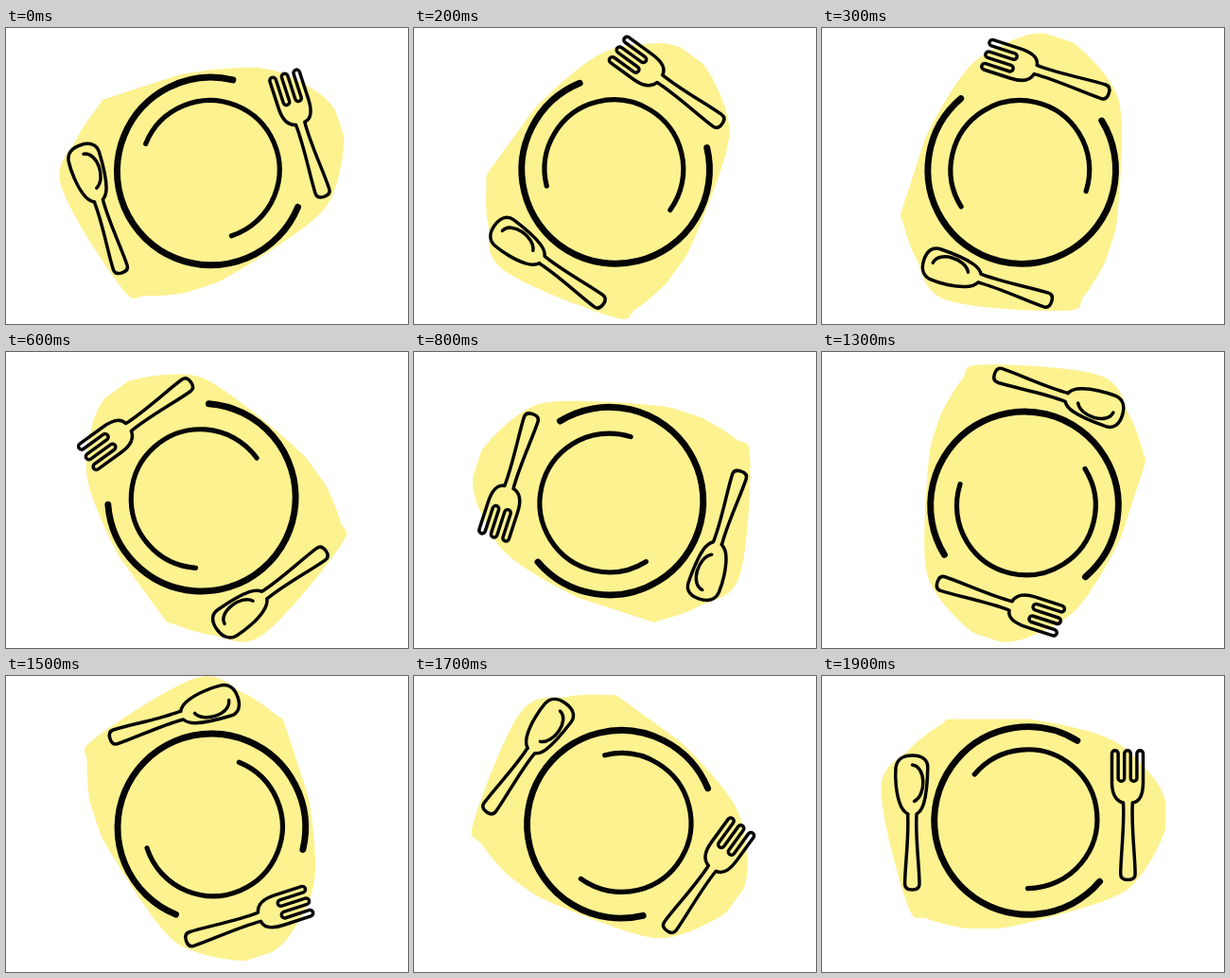
An HTML page with a canvas that plays this animation: 425 px wide and 313 px high, repeating every 2 s.

```html
<!DOCTYPE html>
<html lang="en">
<head>
<meta charset="utf-8">
<title>Turning plate</title>
<style>
  html, body { margin: 0; width: 100%; height: 100%; overflow: hidden; background: #fff; }
  canvas { display: block; }
</style>
</head>
<body>
<canvas id="stage" width="425" height="313"></canvas>
<script>
const ctx = document.getElementById('stage').getContext('2d');
const W = 425, H = 313;
const STEPS = 20, STEP_MS = 100;
const CENTER = { x: 212.6, y: 156.2 };
const YELLOW = '#fdf290', INK = '#050505';

// Key points of the mat, clockwise from the left corner
const mat = smoothLoop([
  [62.5, 120], [93, 77], [126, 51], [142, 45], [214, 45], [301, 65],
  [344, 100], [363, 132], [362, 165], [336, 212], [303, 236],
  [217, 261], [165, 268], [112, 257], [90, 241]
]);
const rim = arc(218, 153, 99.3, 40.4, 301.5);
const well = arc(217.5, 151.2, 73.4, 220, 450);
const spoon = spoonPath();
const shine = new Path2D('M95.5 94 C110 96 110.5 126 97.5 132.5');
const fork = forkPath();

// Closed curve through all points
function smoothLoop(pts) {
  const path = new Path2D();
  const n = pts.length;
  const at = i => pts[(i + n) % n];
  path.moveTo(...pts[0]);
  for (let i = 0; i < n; i++) {
    const [a, b, c, d] = [at(i - 1), at(i), at(i + 1), at(i + 2)];
    path.bezierCurveTo(
      b[0] + (c[0] - a[0]) / 6, b[1] + (c[1] - a[1]) / 6,
      c[0] - (d[0] - b[0]) / 6, c[1] - (d[1] - b[1]) / 6,
      c[0], c[1]);
  }
  path.closePath();
  return path;
}

function arc(x, y, radius, from, to) {
  const path = new Path2D();
  path.arc(x, y, radius, from * Math.PI / 180, to * Math.PI / 180);
  return path;
}

// Handle widening from the right side of the neck round to the left side
function addHandle(path, mid, neckY, neckHalf, endY) {
  const half = 7.7;
  path.bezierCurveTo(mid + neckHalf - 1.5, neckY + 24, mid + half, endY - 24, mid + half, endY - 6);
  path.quadraticCurveTo(mid + half, endY, mid, endY);
  path.quadraticCurveTo(mid - half, endY, mid - half, endY - 6);
  path.bezierCurveTo(mid - half, endY - 24, mid - neckHalf + 1.5, neckY + 24, mid - neckHalf, neckY);
}

function spoonPath() {
  const path = new Path2D(
    'M91 146 Q85 143 82 134 C78.5 124 77 108 78 97 C79 88 86 84 95.5 84 ' +
    'C105 84 112 88 111.8 97 C111.5 112 110.5 125 107.5 135 Q105 143 100 146');
  addHandle(path, 95.3, 146, 4.7, 226);
  path.closePath();
  return path;
}

function forkPath() {
  const path = new Path2D();
  const left = 306.5, gap = 6.6, r = gap / 2;
  const tipY = 82, slotY = 108, bodyY = 112;
  path.moveTo(left, bodyY);
  for (let i = 0; i < 5; i++) {
    const isSlot = i % 2 === 1;
    path.arc(left + gap * i + r, isSlot ? slotY : tipY, r, Math.PI, 0, isSlot);
  }
  path.lineTo(left + gap * 5, bodyY);
  path.bezierCurveTo(339.5, 124, 336, 133, 328.3, 134);
  addHandle(path, 323.4, 134, 4.9, 215.5);
  path.bezierCurveTo(310, 132, left, 124, left, bodyY);
  path.closePath();
  return path;
}

function stroke(path, width) {
  ctx.lineWidth = width;
  ctx.stroke(path);
}

function draw(time) {
  const step = Math.floor(time / STEP_MS) % STEPS;
  ctx.fillStyle = '#fff';
  ctx.fillRect(0, 0, W, H);

  ctx.save();
  ctx.translate(CENTER.x, CENTER.y);
  ctx.rotate(-(step + 1) / STEPS * 2 * Math.PI);
  ctx.translate(-CENTER.x, -CENTER.y);

  // The mat is cut off flat at its bounding box
  ctx.beginPath();
  ctx.rect(62, 45.5, 301, 221.5);
  ctx.clip();

  ctx.fillStyle = YELLOW;
  ctx.fill(mat);
  ctx.strokeStyle = INK;
  ctx.lineCap = ctx.lineJoin = 'round';
  stroke(rim, 6.9);
  stroke(well, 5.2);
  for (const part of [spoon, shine, fork]) stroke(part, 3.5);
  ctx.restore();
}

const start = performance.now();
function tick() {
  draw(performance.now() - start);
  requestAnimationFrame(tick);
}
tick();
</script>
</body>
</html>
```
